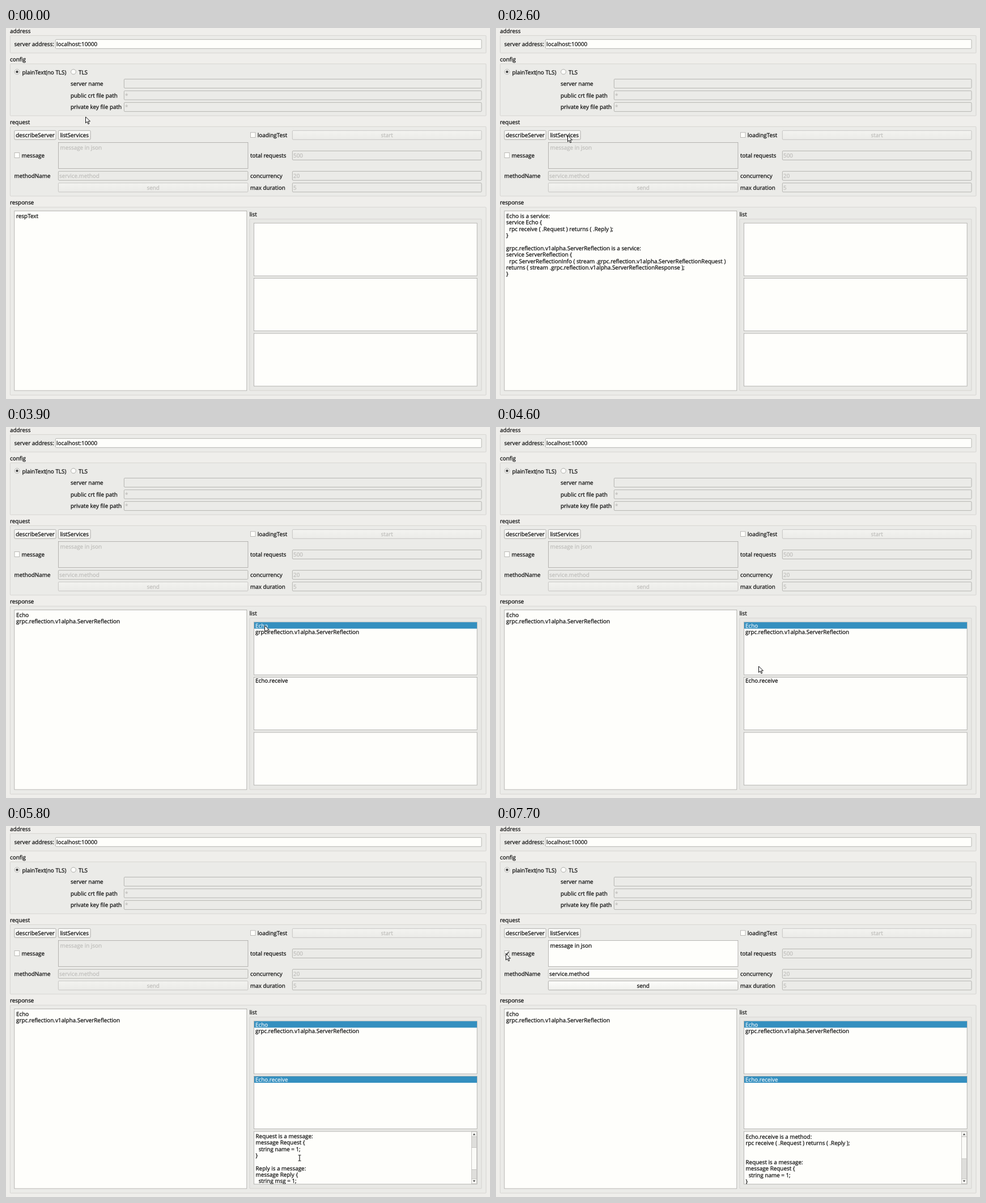
Animation of 854x656 px, one loop 8 s. Source, as an HTML page:

```html
<!DOCTYPE html>
<html lang="en">
<head>
<meta charset="utf-8">
<title>gRPC client</title>
<style>
html, body { margin: 0; width: 100%; height: 100%; overflow: hidden; background: #efeeeb; }
svg { display: block; width: 854px; height: 656px; }
text { font: 9.9px "Open Sans", "Noto Sans", sans-serif; white-space: pre; text-rendering: geometricPrecision; stroke-width: .25; }
</style>
</head>
<body>
<svg id="stage" viewBox="0 0 854 656"></svg>
<script>
const LOOP = 8000, STEP = 100, LINE = 11.35;
const THIN = .7, FIELD = 16.67, RIGHT = 839.4;
const INK = '#0c0c0c', DIM = '#bfbebb', PANEL = '#ebebe8', BASE = '#fefefb', EDGE = '#9d9c99', BLUE = '#348fbf';
const stage = document.getElementById('stage');

// Pointer path: time, x, y
const path = [
  [0, 140, 157], [200, 123, 120], [300, 123, 120], [700, 45, 188], [900, 7, 205], [1100, 34, 188],
  [1500, 34, 188], [2300, 136, 185], [2600, 126, 190], [2900, 126, 190], [3100, 100, 222],
  [3600, 462, 367], [3700, 456, 351], [3900, 456, 351], [4200, 459, 349], [4300, 459, 349],
  [4700, 464, 447], [4800, 464, 447], [5300, 518, 587], [6000, 518, 587], [6600, 55, 226],
  [6800, 69, 211], [7300, 17, 226], [8000, 17, 226]
];
// Wheel notches: time, offset
const notches = [[5400, 40], [5500, 80], [5600, 86], [5800, 46], [6000, 6], [6100, 0]];

const described = `Echo is a service:
service Echo {
  rpc receive ( .Request ) returns ( .Reply );
}

grpc.reflection.v1alpha.ServerReflection is a service:
service ServerReflection {
  rpc ServerReflectionInfo ( stream .grpc.reflection.v1alpha.ServerReflectionRequest )
returns ( stream .grpc.reflection.v1alpha.ServerReflectionResponse );
}`;
const services = 'Echo\ngrpc.reflection.v1alpha.ServerReflection';
const method = `Echo.receive is a method:
rpc receive ( .Request ) returns ( .Reply );


Request is a message:
message Request {
  string name = 1;
}

Reply is a message:
message Reply {
  string msg = 1;
}`;

// All boxes are given by their left, top, right and bottom edges.
const box = (x, y, r, b, fill, stroke = EDGE, round = 0) =>
  `<rect x="${x + THIN / 2}" y="${y + THIN / 2}" width="${r - x - THIN}" height="${b - y - THIN}" rx="${round}" fill="${fill}" stroke="${stroke}" stroke-width="${THIN}"/>`;
const text = (x, y, s, fill = INK, anchor = 'start') =>
  `<text x="${x}" y="${y + 3.6}" fill="${fill}" stroke="${fill}" text-anchor="${anchor}">${s}</text>`;
const lines = (x, y, s, fill) =>
  s.split('\n').map((row, i) => row && text(x, y + i * LINE, row, fill)).join('');
const group = (title, x, y, r, b, fill = PANEL) => text(x, y - 8, title) + box(x, y, r, b, fill, '#cccbc8', 1);
const field = (x, y, r, s = '', on = false) =>
  box(x, y, r, y + FIELD, on ? BASE : PANEL, EDGE, 1.5) + text(x + 2, y + FIELD / 2, s, on ? INK : DIM);
const button = (x, y, r, s, on = true, down = false) =>
  box(x, y, r, y + FIELD, down ? '#dbdbd8' : on ? 'url(#raised)' : 'url(#flat)', on ? '#92918e' : '#b6b5b2', 1.5) +
  text((x + r) / 2, y + FIELD / 2, s, on ? INK : DIM, 'middle');
const radio = (x, y, s, on) =>
  `<circle cx="${x}" cy="${y}" r="4.4" fill="${BASE}" stroke="#8f8e8b" stroke-width="${THIN}"/>` +
  (on ? `<circle cx="${x}" cy="${y}" r="2.3" fill="#444"/>` : '') + text(x + 9, y + .5, s);
const check = (x, y, s, on) => box(x, y, x + 9.4, y + 9.4, BASE, '#a3a29f') +
  (on ? `<path d="M${x + 2.5} ${y + 5}l2 2.5 3-5.5" fill="none" stroke="#333" stroke-width="1.6"/>` : '') +
  text(x + 12.7, y + 5, s);
const row = (y, s, on) =>
  (on ? `<rect x="438" y="${y - 5.8}" width="393" height="${LINE}" fill="${BLUE}"/>` : '') + text(440, y, s, on ? '#e5f0f6' : INK);

function pointAt(t) {
  const i = path.findIndex(p => p[0] > t), [t0, x0, y0] = path[i - 1], [t1, x1, y1] = path[i];
  const k = (t - t0) / (t1 - t0);
  return [Math.round(x0 + (x1 - x0) * k), Math.round(y0 + (y1 - y0) * k)];
}

function cursor(t) {
  const [x, y] = pointAt(t);
  const inside = (l, top, r, b) => x > l && x < r && y > top && y < b;
  if (inside(15, 323, 425, 641) || t >= 4700 && inside(437, 540, 821, 633))
    return `<path d="M${x - 2.5} ${y - 5}h2l.5.5.5-.5h2M${x} ${y - 5}v10M${x - 2.5} ${y + 5}h5" fill="none" stroke="#222" stroke-width="1.2"/>`;
  return `<path d="M${x + .5} ${y}v11l2.6-2.4 1.9 4.3 1.8-.8-1.9-4.1h3.6z" fill="#fff" stroke="#111" stroke-width="1" stroke-linejoin="round"/>`;
}

function details(t) {
  const top = notches.reduce((v, [at, offset]) => t >= at ? offset : v, 0);
  const thumb = 549 + top * .42, edge = '#b9b8b5';
  return `<g clip-path="url(#view)">${lines(440.5, 549 - top, method)}</g>` +
    box(821, 540, 831, 633, '#dededb', edge) +
    box(821, 540, 831, 549.5, '#f4f4f1', edge) + box(821, 623.5, 831, 633, '#f4f4f1', edge) +
    box(821, thumb, 831, thumb + 39.5, '#fafaf7', edge) +
    '<path d="M823.8 546.5h4.4l-2.2-3zM823.8 626.5h4.4l-2.2 3z" fill="#444"/>';
}

const defs = `<defs>
<linearGradient id="raised" x2="0" y2="1"><stop stop-color="#fdfdfb"/><stop offset="1" stop-color="#f0f0ed"/></linearGradient>
<linearGradient id="flat" x2="0" y2="1"><stop stop-color="#f3f3f0"/><stop offset="1" stop-color="#ebebe8"/></linearGradient>
<clipPath id="view"><rect x="438" y="541" width="383" height="92"/></clipPath></defs>`;

const fixed = defs +
  group('address', 7, 13, 847.4, 44.5) + text(14.5, 28.5, 'server address:') + field(87, 20, RIGHT, 'localhost:10000', true) +
  group('config', 7, 63, 847.4, 155.5) + radio(19.5, 77.5, 'plainText(no TLS)', true) + radio(119, 77.5, 'TLS') +
  text(114, 98.3, 'server name') + field(208, 90, RIGHT) +
  text(114, 119, 'public crt file path') + field(208, 110.67, RIGHT, '*') +
  text(114, 139.7, 'private key file path') + field(208, 131.33, RIGHT, '*') +
  group('request', 7, 174, 847.4, 297.5) + button(92, 181, 149.4, 'listServices') +
  check(431, 184.5, 'loadingTest') + button(505, 181, RIGHT, 'start', false) +
  text(431, 225.5, 'total requests') + field(505, 217, RIGHT, '500') +
  text(14.5, 261.3, 'methodName') + text(431, 261.3, 'concurrency') + field(505, 253, RIGHT, '20') +
  text(431, 282, 'max duration') + field(505, 273.67, RIGHT, '5') +
  group('response', 7, 316.5, 847.4, 649.5) + box(14.5, 323.3, 425.2, 641.4, BASE) +
  group('list', 429.5, 337.5, RIGHT, 641.4, '#e8e8e5') +
  [344.7, 442.2, 539.7].map(y => box(437, y, 831.5, y + 93.8, BASE)).join('');

function draw(t) {
  const on = t >= 7600;
  const reply = t < 1500 ? 'respText' : t < 2800 ? described : services;
  let out = fixed + button(14.5, 181, 88.5, 'describeServer', true, t >= 1200 && t < 1500) +
    check(14.7, 220.3, 'message', on) +
    box(92, 202, 427.3, 248.7, on ? BASE : PANEL) + text(95.5, 211, 'message in json', on ? INK : DIM) +
    field(92, 253, 427.3, 'service.method', on) + button(92, 273.67, 427.3, 'send', on) +
    lines(18, 332.5, reply);
  if (t >= 2800) out += row(351, 'Echo', t >= 3900) + row(362.5, services.split('\n')[1]);
  if (t >= 3900) out += row(448.5, 'Echo.receive', t >= 4700);
  if (t >= 4700) out += details(t);
  stage.innerHTML = out + cursor(t);
}

let last = -1;
const start = performance.now();
function tick() {
  const t = Math.floor((performance.now() - start) % LOOP / STEP) * STEP;
  if (t !== last) draw(last = t);
  requestAnimationFrame(tick);
}
tick();
</script>
</body>
</html>
```
